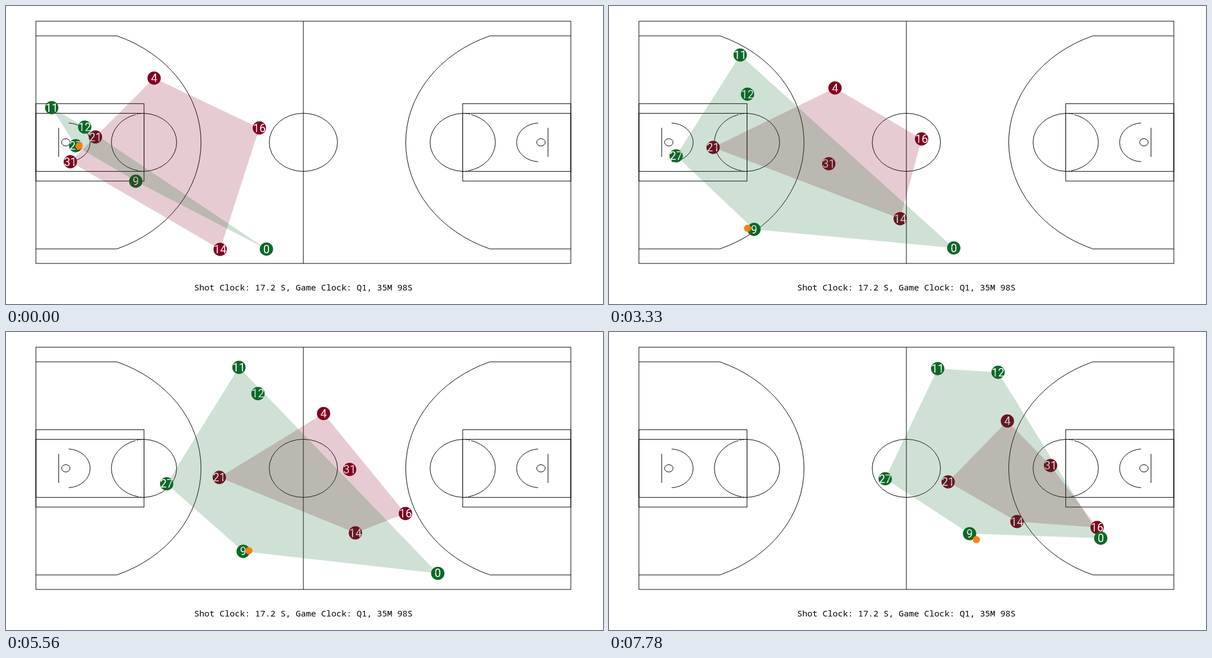
Recreate the animation shown at these times as an HTML page. Size 1058x529 px, loop 8000 ms.

```html
<!DOCTYPE html>
<html lang="en">
<head>
<meta charset="utf-8">
<title>Court tracking</title>
<style>
  html, body { margin: 0; width: 100%; height: 100%; overflow: hidden; background: #fff; }
  svg { display: block; width: 100%; height: 100%; }
  .court { fill: none; stroke: #000; stroke-width: 1; }
  .num { font: 20px Roboto, sans-serif; fill: #fff; text-anchor: middle; }
  .clock { font: 15px "Noto Sans Mono", monospace; text-anchor: middle; }
</style>
</head>
<body>
<svg viewBox="0 0 1058 529">
  <defs>
    <g id="half">
      <path d="M53 53H196.5A239.5 204.2 0 0 1 196.5 431.2H53"/>
      <rect x="53" y="173.4" width="191.6" height="137.4"/>
      <rect x="53" y="190.5" width="191.6" height="103.1"/>
      <path d="M244.6 190.5A60.5 51.6 0 0 1 244.6 293.6"/>
      <path d="M244.6 190.5A60.5 51.6 0 0 0 244.6 293.6" stroke-dasharray="3 2 3 2 3 2 146 2 3 2 3 2 3"/>
      <path d="M111 207.7A40.3 34.4 0 0 1 111 276.4M93.4 216.3V267.8"/>
      <ellipse cx="106" cy="242" rx="7.5" ry="6.5"/>
    </g>
  </defs>
  <g class="court">
    <rect x="53" y="27" width="948" height="430"/>
    <path d="M527 27V457"/>
    <ellipse cx="527" cy="242" rx="60.5" ry="51.6"/>
    <use href="#half"/>
    <use href="#half" transform="translate(1054 0) scale(-1 1)"/>
  </g>
  <g id="discs"></g>
  <g id="nums"></g>
  <g id="areas"></g>
  <g id="top"></g>
  <text class="clock" x="527" y="505">Shot Clock: 17.2 S, Game Clock: Q1, 35M 98S</text>
</svg>
<script>
const LOOP = 8000, STEPS = 36;
const RED = '#800020', GREEN = '#0e6828';
const RUN = [0, 5, 15, 28, 35];   // steps of each player's key points
const PASS = [0, 5, 10, 15];      // steps of the ball until number 9 has it

function add(parent, tag, attrs) {
  const el = document.createElementNS('http://www.w3.org/2000/svg', tag);
  for (const k in attrs) el.setAttribute(k, attrs[k]);
  document.getElementById(parent).append(el);
  return el;
}

// Polynomial in time through a few key points (Lagrange)
const path = (steps, points) => s => {
  const pos = [0, 0];
  steps.forEach((a, i) => {
    const w = steps.reduce((p, b, j) => j === i ? p : p * (s - b) / (a - b), 1);
    pos[0] += w * points[i][0];
    pos[1] += w * points[i][1];
  });
  return pos;
};

function player(color, num, ...points) {
  const disc = add('discs', 'circle', { r: 11.8, fill: color });
  const label = add('nums', 'text', { class: 'num', y: 7 });
  label.textContent = num;
  const at = path(RUN, points);
  return s => {
    const p = at(s), move = `translate(${p})`;
    disc.setAttribute('transform', move);
    label.setAttribute('transform', move);
    return p;
  };
}

function hull(pts) {
  const chain = list => {
    const out = [];
    for (const p of list) {
      while (out.length > 1) {
        const [a, b] = out.slice(-2);
        if ((b[0] - a[0]) * (p[1] - a[1]) > (b[1] - a[1]) * (p[0] - a[0])) break;
        out.pop();
      }
      out.push(p);
    }
    return out.slice(0, -1);
  };
  const sorted = [...pts].sort((a, b) => a[0] - b[0] || a[1] - b[1]);
  return [...chain(sorted), ...chain(sorted.reverse())];
}

function team(color, players) {
  const area = add('areas', 'polygon', { fill: color, 'fill-opacity': .2 });
  return s => area.setAttribute('points', hull(players.map(p => p(s))).join(' '));
}

const red = team(RED, [
  player(RED, 4, [262.5, 128], [275, 142.5], [400.5, 145.5], [608.5, 147], [706, 158]),
  player(RED, 16, [449, 216.5], [477, 223.5], [554, 236], [762, 349], [865, 347]),
  player(RED, 21, [158.5, 232.5], [111.5, 243.5], [184.5, 251], [445, 261], [601, 266]),
  player(RED, 31, [114, 276.5], [185, 288], [389.5, 280], [668, 235], [782.5, 237]),
  player(RED, 14, [379.5, 432], [411, 413.5], [516, 377.5], [648, 352], [723, 336.5])
]);

const nine = player(GREEN, 9, [230, 311], [215, 342.5], [257, 396.5], [486, 378], [639, 358]);
const green = team(GREEN, [
  player(GREEN, 11, [81, 180.5], [110, 146], [232.5, 87], [469, 62], [582.5, 65]),
  player(GREEN, 12, [139.5, 215], [153.5, 199.5], [245.5, 156.5], [521, 96.5], [689.5, 71.5]),
  player(GREEN, 27, [123.5, 248], [95, 246], [119, 266], [351, 266], [489.5, 260.5]),
  nine,
  player(GREEN, 0, [461.5, 431.5], [498.5, 429.5], [611, 429.5], [808.5, 420.5], [871.5, 366])
]);

const ball = add('top', 'circle', { r: 6.3, fill: '#ff7f0e' });
const pass = path(PASS, [[129.5, 248.5], [80, 242], [81, 264], [245.5, 394.5]]);

// The ball swings ahead of number 9 in a widening dribble
function dribble(s) {
  const [x, y] = nine(s);
  return [x + 12 * Math.tanh((s - 20) / 4), y - (s - 14) / 2 * Math.cos((s - 28) * Math.PI / 7)];
}

// Step starts fall on whole hundredths of a second
const stepStart = k => 10 * Math.round(k * LOOP / STEPS / 10);

function draw(ms) {
  const t = ms % LOOP;
  let s = Math.min(STEPS - 1, Math.floor((t + 5) * STEPS / LOOP));
  if (t < stepStart(s)) s--;
  red(s);
  green(s);
  ball.setAttribute('transform', `translate(${s > 15 ? dribble(s) : pass(s)})`);
}

let start;
function tick(now) {
  start ??= now;
  draw(Math.max(0, now - start));
  requestAnimationFrame(tick);
}
draw(0);
requestAnimationFrame(tick);
</script>
</body>
</html>
```
